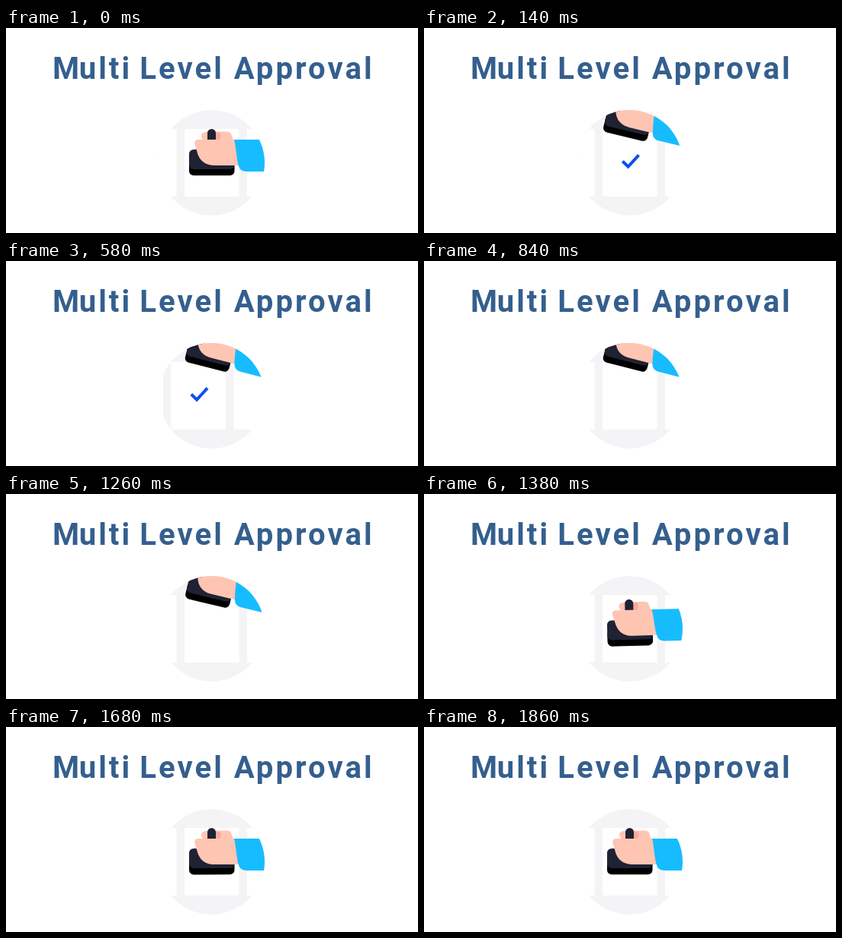
Animation, 540 px wide and 270 px high, one loop 2.36 s. Source, as an HTML page:

```html
<!DOCTYPE html>
<html lang="en">
<head>
<meta charset="utf-8">
<title>Multi Level Approval</title>
<style>
  html, body { margin: 0; width: 100%; height: 100%; overflow: hidden; background: #fff; }
  svg { display: block; width: 540px; height: 270px; }
  text { font: 700 40px Roboto, Inter, sans-serif; letter-spacing: 3.1px; fill: #345f8e; }
</style>
</head>
<body>
<svg viewBox="0 0 540 270">
  <defs>
    <clipPath id="lens"><circle cx="269.5" cy="177.5" r="69.5"/></clipPath>
  </defs>

  <text y="66.6"><tspan x="61">M</tspan><tspan dx="-3.5">ulti</tspan> <tspan x="175.2">Level</tspan> <tspan x="298.7">Approval</tspan></text>

  <g clip-path="url(#lens)">
    <circle cx="269.5" cy="177.5" r="69.5" fill="#f4f4f7"/>

    <g id="pages">
      <g fill="#fff">
        <rect x="152" y="133" width="71.5" height="89"/>
        <rect x="234" y="133" width="71.5" height="89"/>
        <rect x="316" y="133" width="71.5" height="89"/>
        <rect x="398" y="133" width="71.5" height="89"/>
      </g>
      <path id="tick" d="M260.300 175.500 L267.600 182.700 L281.500 167.400" fill="none" stroke="#0b4ff0" stroke-width="4"/>
    </g>

    <g id="stamp">
      <rect x="240" y="172" width="59.5" height="22.3" rx="6" fill="#000"/>
      <path d="M257 160 H246.500 Q240 160 240 166.500 V179.500 Q240 186 246.500 186 H293 Q299.500 186 299.500 179.500 V176 H270 Z" fill="#1f2233"/>
      <path d="M262 137 C257 137 254.500 141 257 145 L260 150 H299 L295 139.500 Q293.500 136.500 290 136.500 H268 Z" fill="#ffc5b3"/>
      <path d="M274 137.500 H278 Q282 138 281.500 142 L280.500 148 H274 Z" fill="#f6ab9a"/>
      <path d="M264 148 V138.500 A5.500 5.500 0 0 1 275 138.500 V148 Z" fill="#1f2233"/>
      <path d="M252 147 H300 L305 181 H273 C261 181 253 174.500 250.300 162.500 L247.400 153 Q246.500 147 252 147 Z" fill="#ffc5b3"/>
      <path d="M299 147 H360 V189 H315 Q307 189 305 182 C302 172 302 160 299 147 Z" fill="#17bcff"/>
    </g>
  </g>
</svg>

<script>
const LOOP = 2360, STEP = 20, PITCH = 82;
const LIFT = { at: 0, decay: 10, freq: 14.14 };
const SLIDE = { at: 540, span: 300 };
const PRESS = { at: 1243, decay: 14.6, freq: 21 };

const pages = document.getElementById('pages');
const tick = document.getElementById('tick');
const stamp = document.getElementById('stamp');

// Damped spring going from 0 to 1
function spring(t, { at, decay, freq }) {
  const s = (t - at) / 1000;
  if (s <= 0) return 0;
  const a = freq * s;
  return 1 - Math.exp(-decay * s) * (Math.cos(a) + decay / freq * Math.sin(a));
}

function easeOut(u) {
  const v = Math.min(1, Math.max(0, u));
  return 1 - Math.pow(1 - v, 1.68);
}

// 0 is pressed on the page, 1 is raised
function raise(t) {
  if (t >= 1860) return 0;
  if (t >= PRESS.at) return 1 - spring(t, PRESS);
  return t >= 540 ? 1 : spring(t, LIFT);
}

function draw(t) {
  const p = raise(t);
  stamp.setAttribute('transform',
    `translate(${-5.2 * p} ${-60.4 * p}) rotate(${14.5 * p} 246 188)`);

  const u = (t - SLIDE.at) / SLIDE.span;
  const x = u < 1 ? -PITCH * easeOut(u) : 0;
  pages.setAttribute('transform', `translate(${x} 0)`);
  tick.setAttribute('visibility', u < 1 ? 'visible' : 'hidden');
}

const start = performance.now();
function frame() {
  const t = (performance.now() - start) % LOOP;
  draw(Math.floor(t / STEP) * STEP);
  requestAnimationFrame(frame);
}
draw(0);
requestAnimationFrame(frame);
</script>
</body>
</html>
```
